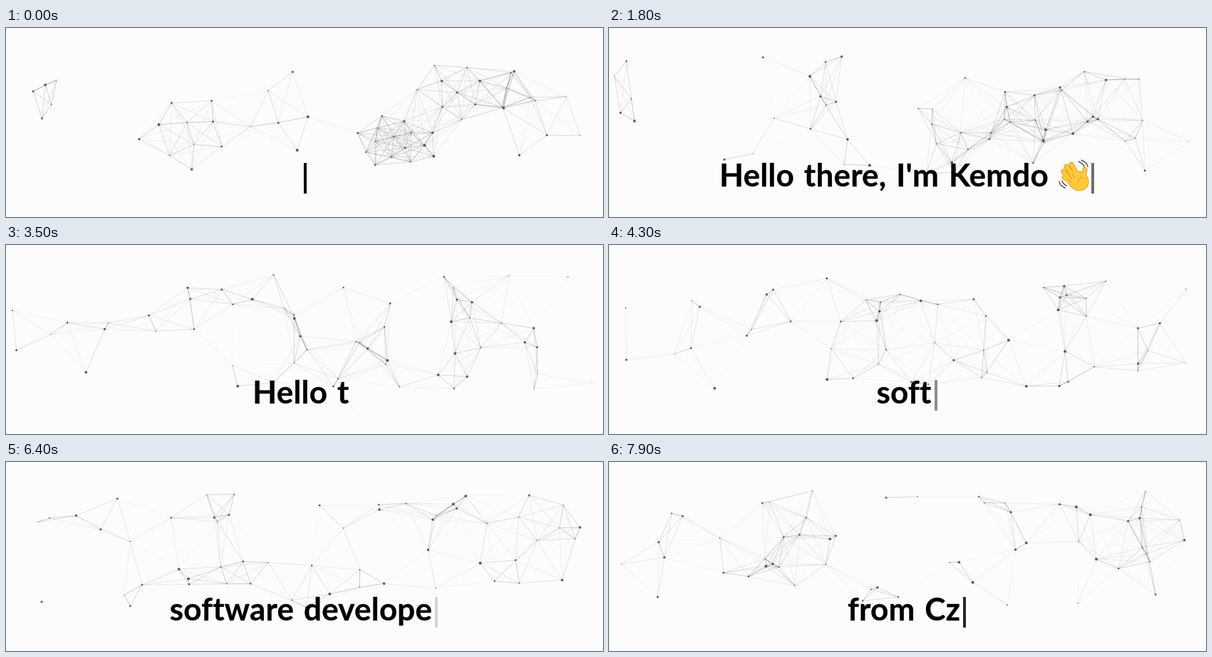
Recreate the animation shown at these times as an HTML page. Size 838 by 266 pixels, loop 8 s.

```html
<!DOCTYPE html>
<html lang="en">
<head>
<meta charset="utf-8">
<title>Typing banner</title>
<style>
  html, body { margin: 0; width: 100%; height: 100%; overflow: hidden; background: #fcfcfc; }
  #net { position: absolute; left: 0; top: 0; width: 838px; height: 266px; }
  #row {
    position: absolute; left: 0; top: 177px; width: 838px; height: 59px;
    display: flex; justify-content: center; align-items: center;
    font: 700 44px/59px Lato, "Open Sans", sans-serif;
    letter-spacing: .2px; word-spacing: 3px; white-space: pre;
    color: #000; -webkit-text-stroke: .3px #000;
  }
  .emoji { width: 44px; height: 44px; margin-right: -2px; flex: none; display: none; }
  #cursor { width: 4px; height: 43px; margin: 10px 2px 0 4px; background: #000; flex: none; }
</style>
</head>
<body>
<svg id="net" viewBox="0 0 838 266">
  <g id="links" stroke="#000" stroke-width=".8"></g>
  <g id="dots" fill="#5a5a5a"></g>
</svg>
<div id="row"><span id="text"></span><svg id="wave" class="emoji" viewBox="0 0 44 44">
    <defs>
      <g id="hand" stroke-linecap="round" stroke-linejoin="round">
        <path fill="none" d="M28 25L18 7M24 27L11 10M20 30L7 17M21 33L8 25M33 31C38 25 35 20 37 14"/>
        <path d="M18 25L30 20L37 25C42 34 37 40 30 41C23 41 19 36 16 31Z"/>
      </g>
    </defs>
    <use href="#hand" fill="#e39a1d" stroke="#e39a1d" stroke-width="7"/>
    <use href="#hand" fill="#ffc93c" stroke="#ffc93c" stroke-width="5.2"/>
    <path d="M19 20L23 26M14 22L19 28M12 27L17 31M34 25Q28 26 27 32" fill="none" stroke="#dc941c"/>
    <path d="M28 3Q35 6 36 10M32 1Q40 4 41 10M1 31Q2 37 9 40M5 30Q6 34 11 37" fill="none" stroke="#555" stroke-width="1.5" stroke-linecap="round"/>
  </svg><svg id="coder" class="emoji" viewBox="0 0 44 44">
    <path d="M3 43Q3 29 14 27H30Q41 29 41 43Z" fill="#2749b5"/>
    <path d="M17 22H27V30L22 33L17 30Z" fill="#e9a62e"/>
    <ellipse cx="22" cy="15" rx="10" ry="12" fill="#ffcd45"/>
    <path d="M11 17C8 5 15 1 22 1.500C31 1 36 7 33 17L31 12Q23 12 18 8Q16 12 13 12Z" fill="#e8a823"/>
    <g fill="#4a3720"><circle cx="18" cy="16" r="1.300"/><circle cx="26" cy="16" r="1.300"/></g>
    <path d="M19 21Q22 23 25 21" fill="none" stroke="#8b5a20"/>
    <path d="M8 25H36Q38 25 38 27L37 41H7L6 27Q6 25 8 25Z" fill="#85888d"/>
    <path d="M6 41H38V43H6Z" fill="#606368"/>
    <circle cx="22" cy="34" r="2" fill="#eee"/>
  </svg><div id="cursor"></div></div>
<script>
const LOOP = 8000, STEP = 100;
const TYPE_MS = 68, ERASE_MS = 58, HOLD_MS = 860, GAP_MS = 78;
const REACH = 95;
const BOX = { left: 5, right: 832, top: 40, bottom: 206 };
const byId = id => document.getElementById(id);

let seed = 29;
const random = () => (seed = seed * 16807 % 2147483647) / 2147483647;
const speed = () => (random() - .5) * 90;

const clusters = [
  { x: 55, y: 92, rx: 24, ry: 38, n: 5 },
  { x: 250, y: 145, rx: 75, ry: 56, n: 10 },
  { x: 385, y: 115, rx: 62, ry: 65, n: 6 },
  { x: 545, y: 160, rx: 66, ry: 40, n: 15 },
  { x: 650, y: 88, rx: 90, ry: 46, n: 13 },
  { x: 740, y: 122, rx: 75, ry: 75, n: 7 }
];

// A golden-angle spiral spreads each cluster evenly over its ellipse.
const particles = clusters.flatMap(c => Array.from({ length: c.n }, (_, i) => {
  const radius = Math.sqrt((i + .5) / c.n), angle = i * 2.4 + c.x;
  return {
    x: c.x + c.rx * radius * Math.cos(angle),
    y: c.y + c.ry * radius * Math.sin(angle),
    vx: speed(), vy: speed(),
    r: .4 + 1.6 * random()
  };
}));

const phrases = [
  { text: "Hello there, I'm Kemdo ", emoji: "wave" },
  { text: "software developer ", emoji: "coder" },
  { text: "from Cz" }
];
let clock = 0;
for (const p of phrases) {
  p.length = p.text.length + (p.emoji ? 1 : 0);
  p.start = clock;
  p.erase = p.start + p.length * TYPE_MS + HOLD_MS;
  clock = p.erase + p.length * ERASE_MS + GAP_MS;
}

// Folds a straight path back and forth between two walls.
function bounce(value, low, high) {
  const span = high - low;
  const turn = (((value - low) % (2 * span)) + 2 * span) % (2 * span);
  return low + (turn > span ? 2 * span - turn : turn);
}

function drawNetwork(t) {
  const s = t / 1000;
  const now = particles.map(p => ({
    x: bounce(p.x + p.vx * s, BOX.left, BOX.right),
    y: bounce(p.y + p.vy * s, BOX.top, BOX.bottom),
    r: p.r
  }));
  let links = "";
  now.forEach((a, i) => now.slice(i + 1).forEach(b => {
    const d = Math.hypot(a.x - b.x, a.y - b.y);
    if (d < REACH) {
      const alpha = .32 * (1 - d / REACH);
      links += `<path d="M${a.x} ${a.y}L${b.x} ${b.y}" opacity="${alpha.toFixed(3)}"/>`;
    }
  }));
  byId("links").innerHTML = links;
  byId("dots").innerHTML = now.map(p => `<circle cx="${p.x}" cy="${p.y}" r="${p.r}"/>`).join("");
}

function drawText(t) {
  const phrase = phrases.filter(p => t >= p.start).pop();
  const typed = Math.min(phrase.length, Math.floor((t - phrase.start) / TYPE_MS));
  const erased = Math.max(0, Math.floor((t - phrase.erase) / ERASE_MS));
  const shown = Math.max(0, typed - erased);
  byId("text").textContent = phrase.text.slice(0, shown);
  for (const id of ["wave", "coder"]) {
    const visible = id === phrase.emoji && shown === phrase.length;
    byId(id).style.display = visible ? "block" : "none";
  }
  byId("cursor").style.opacity = .5 + .5 * Math.cos(2 * Math.PI * (t / 1000 - .03));
}

let last = -1;
function tick() {
  const t = Math.floor(performance.now() % LOOP / STEP) * STEP;
  if (t !== last) {
    last = t;
    drawNetwork(t);
    drawText(t);
  }
  requestAnimationFrame(tick);
}
tick();
</script>
</body>
</html>
```
